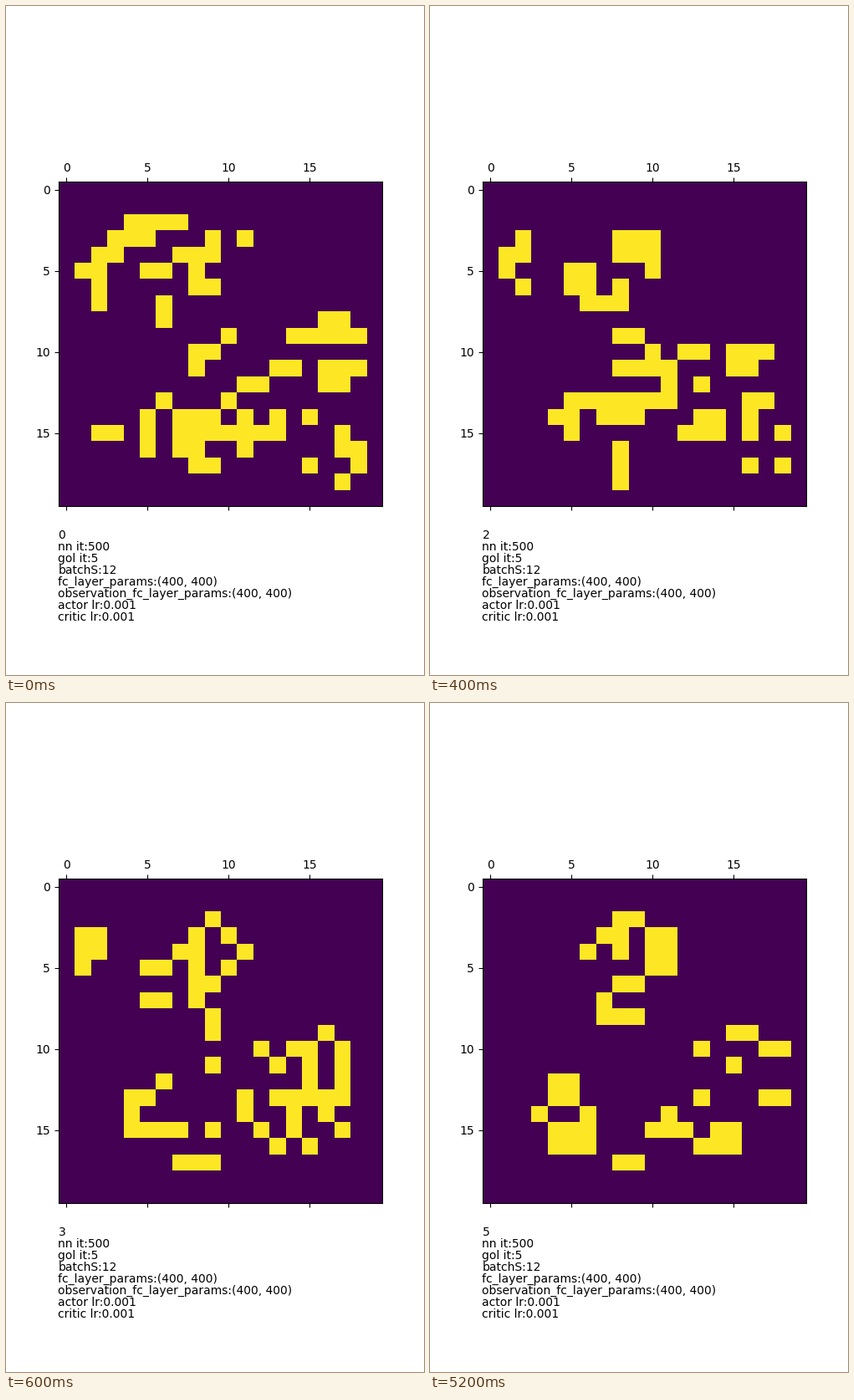
A matplotlib script for the animation above (8 s loop, 500 by 800 pixels).

```python
import numpy as np
import matplotlib.pyplot as plt
from matplotlib.animation import FuncAnimation

STEP_MS = 200
LOOP_MS = 8000
LAST = 5
SIZE = 20
WIDTH, HEIGHT, DPI = 500, 800, 100

# Living cells at the start: row -> columns
SEED = {
    2: "4-7", 3: "3-5 9 11", 4: "2-3 7-9", 5: "1-2 5-6 8", 6: "2 8-9",
    7: "2 6", 8: "6 16-17", 9: "10 14-18", 10: "8-9", 11: "8 13-14 16-18",
    12: "11-12 16-17", 13: "6 10", 14: "5 7-9 11 13 15", 15: "2-3 5 7-13 17",
    16: "5 7-8 11 17-18", 17: "8-9 15 18", 18: "17",
}

INFO = """nn it:500
gol it:5
batchS:12
fc_layer_params:(400, 400)
observation_fc_layer_params:(400, 400)
actor lr:0.001
critic lr:0.001"""


def start_grid():
    grid = np.zeros((SIZE, SIZE), int)
    for row, spans in SEED.items():
        for span in spans.split():
            ends = [int(n) for n in span.split("-")]
            grid[row, ends[0]:ends[-1] + 1] = 1
    return grid


def evolve(grid):
    """One step of Life; the rim of the board stays empty."""
    near = sum(np.roll(grid, (dy, dx), (0, 1))
               for dy in (-1, 0, 1) for dx in (-1, 0, 1)) - grid
    alive = (near == 3) | ((grid == 1) & (near == 2))
    result = np.zeros_like(grid)
    result[2:-1, 1:-1] = alive[2:-1, 1:-1]
    return result


grids = [start_grid()]
for _ in range(LAST):
    grids.append(evolve(grids[-1]))

fig, ax = plt.subplots(figsize=(WIDTH / DPI, HEIGHT / DPI), dpi=DPI)
board = ax.matshow(grids[0], cmap="viridis", vmin=0, vmax=1)
label = fig.text(0.125, 65 / HEIGHT, "", fontsize=10, linespacing=1)


def draw(frame):
    step = min(frame, LAST)
    board.set_data(grids[step])
    label.set_text(f"{step}\n{INFO}")
    return board, label


anim = FuncAnimation(fig, draw, frames=LOOP_MS // STEP_MS, interval=STEP_MS,
                     init_func=lambda: draw(0), repeat=True, repeat_delay=0)
plt.show()
```
